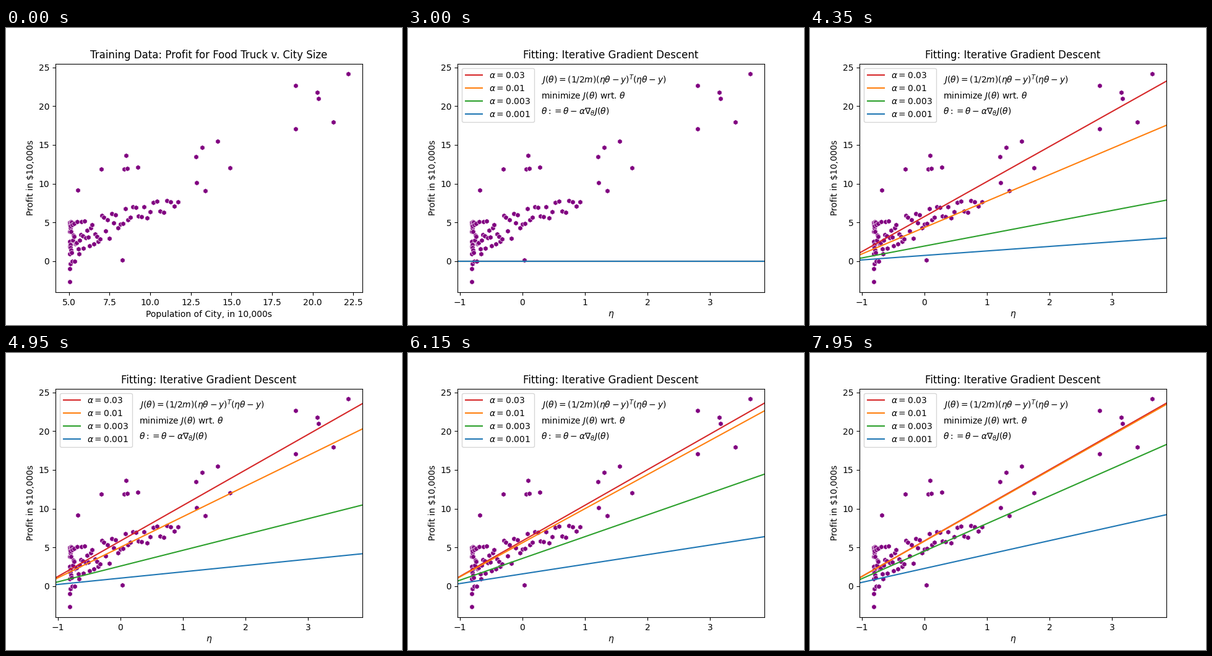
Recreate the animation shown at these times as a matplotlib script. Size 640 by 480 pixels, loop 8 s.

```python
import numpy as np
import matplotlib.pyplot as plt
from matplotlib.animation import FuncAnimation

STEP_MS, LOOP_MS = 50, 8000
SCALED_MS, FIT_MS, HOLD_MS = 1500, 3000, 150
ITERATIONS_PER_HOLD = 15
MEAN, STD = 8.1598, 3.8498
INTERCEPT, SLOPE = 5.8391, 4.5930  # least-squares optimum in scaled units
RATES = {0.03: "C3", 0.01: "C1", 0.003: "C2", 0.001: "C0"}

# Isolated cities; the first and last span the range of the data.
LANDMARKS = [
    (5.027, -2.681), (5.53, 9.13), (7.0, 11.85), (8.38, 11.89), (8.58, 12.0),
    (8.52, 13.66), (9.25, 12.13), (8.29, 0.14), (12.83, 13.5), (12.84, 10.12),
    (13.18, 14.69), (13.39, 9.06), (14.16, 15.51), (14.91, 12.05),
    (18.95, 22.64), (18.96, 17.05), (20.27, 21.77), (20.34, 20.99),
    (21.28, 17.93), (22.203, 24.147)]


def small_cities(count=76, seed=4):
    """Many small cities, with profits scattering less as size grows."""
    rng = np.random.default_rng(seed)
    size = 5.05 + 6.65 * np.linspace(0, 1, count) ** 2.6
    trend = 2 + 7 * np.log(size / 5.2)
    spread = 3.4 * (5 / size) ** 1.6
    return size, trend + spread * rng.uniform(-1, 1, count)


population, profit = np.hstack([small_cities(), np.transpose(LANDMARKS)])
eta = (population - MEAN) / STD

fig = plt.figure(figsize=(6.4, 4.8), dpi=100)


def padded(values, margin=0.05):
    pad = margin * np.ptp(values)
    return values.min() - pad, values.max() + pad


def make_scene(x, title, xlabel):
    ax = fig.add_axes([0.125, 0.11, 0.775, 0.77])
    ax.scatter(x, profit, s=36, marker="h", color="purple",
               edgecolors="white", linewidths=0.48)
    ax.set(title=title, xlabel=xlabel, ylabel=r"Profit in \$10,000s",
           xlim=padded(x), ylim=padded(profit))
    return ax


raw = make_scene(population, "Training Data: Profit for Food Truck v. City Size",
                 "Population of City, in 10,000s")

scaled = make_scene(eta, "Scaled Training Data", r"$\eta$")
scaled.text(-0.5, 20, "X rescaled as", fontsize=12)
scaled.text(-0.5, 18, r"$\eta = (X - \langle X \rangle)/\sigma_X$", fontsize=12)

fit = make_scene(eta, "Fitting: Iterative Gradient Descent", r"$\eta$")
ends = np.array([-1.2, 4.0])
lines = {rate: fit.plot(ends, 0 * ends, color=color, label=rf"$\alpha = {rate}$")[0]
         for rate, color in RATES.items()}
fit.legend(loc="upper left")
fit.text(0.3, 23, r"$J(\theta) = (1/2m)(\eta\theta - y)^T(\eta\theta - y)$")
fit.text(0.3, 21, r"minimize $J(\theta)$ wrt. $\theta$")
fit.text(0.3, 19, r"$\theta := \theta - \alpha\nabla_\theta J(\theta)$")


def update(frame):
    t = frame * STEP_MS
    active = raw if t < SCALED_MS else scaled if t < FIT_MS else fit
    for ax in (raw, scaled, fit):
        ax.set_visible(ax is active)
    # On a standardized feature, both parameters converge at the same rate.
    iterations = max(0, (t - FIT_MS) // HOLD_MS) * ITERATIONS_PER_HOLD
    for rate, line in lines.items():
        progress = 1 - (1 - rate) ** iterations
        line.set_ydata(progress * (INTERCEPT + SLOPE * ends))
    return list(lines.values())


anim = FuncAnimation(fig, update, frames=LOOP_MS // STEP_MS, interval=STEP_MS,
                     repeat=True, repeat_delay=0, blit=False)
plt.show()
```
